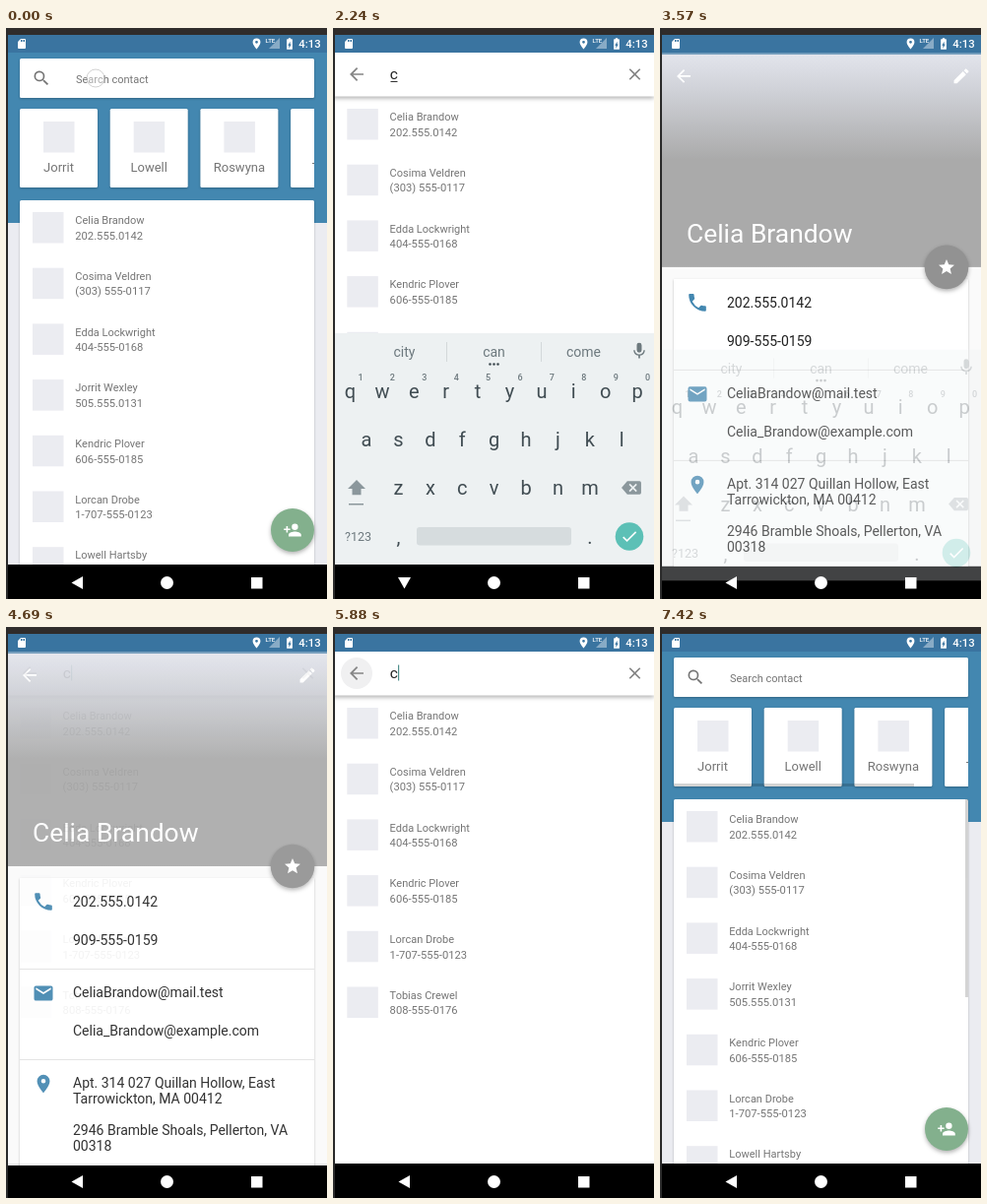
Write an HTML page that moves like this. It is 326x580 px and loops after 7.49 s.

```html
<!DOCTYPE html>
<html lang="en">
<head>
<meta charset="utf-8">
<title>Contacts</title>
<style>
html, body { margin: 0; height: 100%; overflow: hidden; background: #000; }
svg { display: block; width: 100vw; height: 100vh; font-family: Roboto, sans-serif; }
.low { filter: drop-shadow(0 1px 1px rgba(0,0,0,.25)); }
.high { filter: drop-shadow(0 2px 2px rgba(0,0,0,.3)); }
</style>
</head>
<body>
<svg id="stage" viewBox="0 0 326 580"></svg>
<script>
const LOOP = 7490, SLIDE = 46, KEYS_SLIDE = 25;
const PITCH = 56.7;
const GRAY = '#757575', BLUE = '#4387b0', BAR = '#3a74a0', TILE = '#ebecf1';

const people = [
  ['Celia Brandow', '202.555.0142'],
  ['Cosima Veldren', '(303) 555-0117'],
  ['Edda Lockwright', '404-555-0168'],
  ['Jorrit Wexley', '505.555.0131'],
  ['Kendric Plover', '606-555-0185'],
  ['Lorcan Drobe', '1-707-555-0123'],
  ['Lowell Hartsby', '707.555.0194'],
  ['Tobias Crewel', '808-555-0176']
];
const found = people.filter(p => /c/i.test(p[0]));

const icons = {
  back: 'M20 11H7.83l5.59-5.59L12 4l-8 8 8 8 1.41-1.41L7.83 13H20z',
  close: 'M19 6.41 17.59 5 12 10.59 6.41 5 5 6.41 10.59 12 5 17.59 6.41 19 12 13.41 17.59 19 19 17.59 13.41 12z',
  search: 'M15.5 14h-.79l-.28-.27A6.5 6.5 0 1 0 13.73 14.43l.27.28v.79l5 4.99L20.49 19zm-6 0a4.5 4.5 0 1 1 0-9 4.5 4.5 0 0 1 0 9z',
  add: 'M15 12a4 4 0 1 0 0-8 4 4 0 0 0 0 8zm-9-2V7H4v3H1v2h3v3h2v-3h3v-2zm9 4c-2.67 0-8 1.34-8 4v2h16v-2c0-2.66-5.33-4-8-4z',
  star: 'M12 17.27 18.18 21l-1.64-7.03L22 9.24l-7.19-.61L12 2 9.19 8.63 2 9.24l5.46 4.73L5.82 21z',
  edit: 'M3 17.25V21h3.75L17.81 9.94l-3.75-3.75zM20.71 7.04a1 1 0 0 0 0-1.41l-2.34-2.34a1 1 0 0 0-1.41 0l-1.83 1.83 3.75 3.75z',
  phone: 'M6.62 10.79a15.15 15.15 0 0 0 6.59 6.59l2.2-2.2a1 1 0 0 1 1.02-.24c1.12.37 2.33.57 3.57.57a1 1 0 0 1 1 1V20a1 1 0 0 1-1 1A17 17 0 0 1 3 4a1 1 0 0 1 1-1h3.5a1 1 0 0 1 1 1c0 1.25.2 2.45.57 3.57a1 1 0 0 1-.25 1.02z',
  mail: 'M20 4H4a2 2 0 0 0-2 2v12a2 2 0 0 0 2 2h16a2 2 0 0 0 2-2V6a2 2 0 0 0-2-2zm0 4-8 5-8-5V6l8 5 8-5z',
  pin: 'M12 2a7 7 0 0 0-7 7c0 5.25 7 13 7 13s7-7.75 7-13a7 7 0 0 0-7-7zm0 9.5a2.5 2.5 0 1 1 0-5 2.5 2.5 0 0 1 0 5z',
  mic: 'M12 14a3 3 0 0 0 3-3V5a3 3 0 0 0-6 0v6a3 3 0 0 0 3 3zm5.3-3a5.3 5.3 0 0 1-10.6 0H5a7 7 0 0 0 6 6.72V21h2v-3.28A7 7 0 0 0 19 11z',
  shift: 'M12 3 2 13h5v7h10v-7h5z',
  erase: 'M22 4H7L0 12l7 8h15a2 2 0 0 0 2-2V6a2 2 0 0 0-2-2zm-3 11.6L17.6 17 14 13.4 10.4 17 9 15.6l3.6-3.6L9 8.4 10.4 7l3.6 3.6L17.6 7 19 8.4 15.4 12z',
  check: 'M9 16.17 4.83 12l-1.42 1.41L9 19 21 7l-1.41-1.41z',
  card: 'M18 2h-8L4 8v12a2 2 0 0 0 2 2h12a2 2 0 0 0 2-2V4a2 2 0 0 0-2-2zM12 8h-2V4h2zm3 0h-2V4h2zm3 0h-2V4h2z',
  power: 'M16 4h-2V2h-4v2H8a1 1 0 0 0-1 1v16a1 1 0 0 0 1 1h8a1 1 0 0 0 1-1V5a1 1 0 0 0-1-1zm-5 16v-5H9l4-7v5h2z'
};

const rect = (x, y, w, h, fill, more = '') =>
  `<rect x="${x}" y="${y}" width="${w}" height="${h}" fill="${fill}" ${more}/>`;
const disc = (x, y, r, fill, more = '') =>
  `<circle cx="${x}" cy="${y}" r="${r}" fill="${fill}" ${more}/>`;
const text = (x, y, size, fill, s, more = '') =>
  `<text x="${x}" y="${y}" font-size="${size}" fill="${fill}" ${more}>${s}</text>`;
const mid = (x, y, size, fill, s, more = '') =>
  text(x, y, size, fill, s, 'text-anchor="middle" ' + more);
const icon = (name, x, y, k, fill) =>
  `<path d="${icons[name]}" fill="${fill}" fill-rule="evenodd" transform="translate(${x - 12 * k} ${y - 12 * k}) scale(${k})"/>`;
const group = (id, body) => `<g id="${id}">${body}</g>`;
const panel = (id, bg, body, barAlpha = 1) => group(id,
  rect(0, 25, 326, 520, bg) + body +
  rect(0, 7, 326, 18, BAR, `opacity="${barAlpha}"`) + rect(0, 545, 326, 35, '#000'));

function row([name, phone], i, x, y) {
  const top = y + i * PITCH;
  return rect(x, top, 31.5, 31.5, TILE) +
    text(x + 43.3, top + 12.2, 11, GRAY, name) +
    text(x + 43.3, top + 27.7, 11.2, GRAY, phone);
}

function home() {
  const cards = ['Jorrit', 'Lowell', 'Roswyna', 'Tilden'].map((name, i) => {
    const x = 14 + i * 91.7;
    return rect(x, 82, 79, 80, '#fff', 'rx="1.5" class="low"') +
      rect(x + 24, 95, 31.5, 31.5, TILE) + mid(x + 39.5, 146, 13, GRAY, name);
  }).join('');
  return panel('home', TILE,
    rect(0, 25, 326, 173, BLUE) +
    rect(14, 31, 299, 40, '#fff', 'rx="1.5" class="low"') +
    `<g clip-path="url(#box)">${disc(91, 51, 0, '#000', 'id="tapWave"')}</g>` +
    icon('search', 36, 51, .83, GRAY) + text(71, 55.5, 11, GRAY, 'Search contact') +
    disc(91, 51, 9, '#fff', 'id="touch" fill-opacity=".4" stroke="#999" stroke-opacity=".45"') +
    `<g clip-path="url(#cards)">${cards}</g>` +
    rect(14, 175, 299, 380, '#fff', 'rx="1.5" class="low"') +
    people.slice(0, 7).map((p, i) => row(p, i, 27, 187)).join('') +
    group('bars', rect(14, 159, 244, 3, '#000') + rect(310, 175, 3, 201, '#000')) +
    disc(291, 510, 22, '#83b08d', 'class="high"') + icon('add', 291, 510, .8, '#fff'));
}

function search() {
  return panel('search', '#fff',
    group('results', found.map((p, i) => row(p, i, 14.3, 82)).join('')) +
    `<g clip-path="url(#firstRow)">${disc(150, 98, 0, '#42708f', 'id="rowWave"')}</g>` +
    rect(0, 25, 326, 44.5, '#fff', 'class="high"') +
    disc(24, 47, 0, '#f0f0f1', 'id="backWave"') +
    icon('back', 24, 47, .87, '#858585') + icon('close', 306.5, 47, .83, '#858585') +
    group('query', text(57.7, 52, 15.5, '#222', 'c')) +
    rect(58.5, 54, 7, 1, '#333', 'id="underline"') +
    rect(0, 38.5, 1.2, 16, '#4f8f8c', 'id="caret"'));
}

function detail() {
  const line = (y, s) => text(68, y, 14, '#212121', s);
  return panel('detail', '#fafafa',
    rect(14, 253, 299, 310, '#fff', 'class="low"') +
    rect(0, 25, 326, 216, 'url(#cover)') +
    icon('back', 24, 47, .87, '#fff') + group('edit', icon('edit', 306, 47, .83, '#fff')) +
    text(27, 216, 26.4, '#fff', 'Celia Brandow') +
    disc(291, 241, 22.3, '#929292', 'class="high"') + icon('star', 291, 241, .8, '#fff') +
    icon('phone', 38, 277, .98, BLUE) + line(282, people[0][1]) + line(321, '909-555-0159') +
    rect(14, 345, 299, 1, '#e2e2e2') +
    icon('mail', 38, 370, .95, BLUE) +
    line(374, 'CeliaBrandow@mail.test') + line(413, 'Celia_Brandow@example.com') +
    rect(14, 437, 299, 1, '#e2e2e2') +
    icon('pin', 38, 462, .92, BLUE) +
    line(466, 'Apt. 314 027 Quillan Hollow, East') + line(482.5, 'Tarrowickton, MA 00412') +
    line(514, '2946 Bramble Shoals, Pellerton, VA') + line(530.5, '00318'), .75);
}

function keyboard() {
  const INK = '#414d53', SOFT = '#6d797e', STEP = 32.4;
  const keys = (s, x, y) => [...s].map((c, i) => mid(x + i * STEP, y, 20, INK, c)).join('');
  const hints = [...'1234567890'].map((c, i) =>
    mid(28 + i * STEP, 358, 9, SOFT, c, 'font-weight="500"')).join('');
  const words = ['city', 'can', 'come'].map((w, i) => mid(72.5 + i * 91, 334, 14, SOFT, w)).join('');
  const dots = [159.5, 163.5, 167.5].map(x => disc(x, 341.5, 1.3, INK)).join('');
  return group('keys',
    rect(0, 310, 326, 235, '#edf1f2') + rect(0, 545, 326, 35, '#000') +
    rect(115, 319, 1, 20, '#d3d8da') + rect(211, 319, 1, 20, '#d3d8da') +
    icon('mic', 311, 328, .83, SOFT) + group('words', words + dots) + hints +
    keys('qwertyuiop', 17.5, 375.5) + keys('asdfghjkl', 34, 425) + keys('zxcvbnm', 66.5, 474) +
    icon('shift', 24, 467, .9, '#8b979c') + rect(16, 483, 15, 1.5, '#8b979c') +
    icon('erase', 303, 467, .83, '#8b979c') +
    text(12, 521, 12.5, SOFT, '?123') + mid(66.5, 524, 20, INK, ',') + mid(261, 524, 20, INK, '.') +
    rect(85, 507, 157, 18.5, '#d6dcde', 'rx="3"') +
    disc(301, 516.5, 14.3, '#5cc0b6') + icon('check', 301, 516.5, .8, '#fff'));
}

function chrome() {
  return icon('card', 16, 16, .5, '#fff') + icon('pin', 254.5, 16, .56, '#fff') +
    text(263.5, 14.5, 6, '#fff', 'LTE', 'font-weight="700" opacity=".85"') +
    '<path d="M267 21H278V10Z" fill="#fff" opacity=".4"/>' +
    icon('power', 288, 16, .58, '#fff') +
    text(297.3, 20, 11.3, '#fff', '4:13', 'font-weight="500"') +
    `<path id="navBack" fill="#fff"/>` +
    disc(163.5, 563.5, 6.5, '#fff') + rect(249, 558, 11.5, 11.5, '#fff') +
    rect(0, 0, 326, 7, '#2f2c2b') + rect(0, 0, 2, 580, '#2a2a2a');
}

const clip = (id, x, y, w, h) => `<clipPath id="${id}">${rect(x, y, w, h, '#000')}</clipPath>`;
document.getElementById('stage').innerHTML =
  '<defs>' + clip('box', 14, 31, 299, 40) + clip('cards', 12, 80, 301, 86) +
  clip('firstRow', 0, 70, 326, 56) +
  `<linearGradient id="cover" gradientUnits="userSpaceOnUse" x1="0" y1="25" x2="0" y2="132">
   <stop stop-color="#e2e4ec"/><stop offset=".35" stop-color="#cfd1d7"/><stop offset="1" stop-color="#aaa"/></linearGradient></defs>` +
  home() + search() + detail() + keyboard() + chrome();

const ui = {};
document.querySelectorAll('svg [id]').forEach(e => ui[e.id] = e);

const part = (t, from, to) => Math.min(1, Math.max(0, (t - from) / (to - from)));
const within = (t, from, to) => t >= from && t < to;

function fade(el, a) {
  el.setAttribute('opacity', a);
  el.setAttribute('display', a > 0 ? 'inline' : 'none');
}
function shift(el, y) { el.setAttribute('transform', `translate(0 ${y})`); }
function wave(el, r, a) { el.setAttribute('r', r); fade(el, a); }

// A window rises while fading in, and sinks while fading out.
function openClose(el, t, dist, [inAt, inFor, fadeFor], [outAt, outEnd]) {
  const p = part(t, inAt, inAt + inFor), q = part(t, outAt, outEnd);
  shift(el, dist * ((1 - p) ** 2 + q * q));
  fade(el, t < outAt ? part(t, inAt, inAt + fadeFor) : 1 - q ** 1.6);
}

const blinks = [770, 1190, 1470, 2170, 2380, 5040, 5600];

function draw(t) {
  fade(ui.touch, 1 - part(t, 70, 210));
  wave(ui.tapWave, 230 * part(t, 70, 420), t < 700 ? .1 : 0);
  fade(ui.bars, t > 5900 ? .24 - .07 * part(t, 7210, 7420) : 0);

  openClose(ui.search, t, SLIDE, [260, 365, 133], [5940, 6290]);
  const typed = t >= 1540;
  fade(ui.query, typed ? 1 : 0);
  fade(ui.underline, within(t, 1540, 3640) ? 1 : 0);
  fade(ui.results, part(t, 1680, 1960));
  ui.caret.setAttribute('x', typed ? 66 : 58);
  fade(ui.caret, blinks.filter(b => t >= b).length % 2);
  wave(ui.rowWave, 190 * part(t, 2520, 3150), t < 3800 ? .3 * part(t, 2480, 2700) : 0);
  wave(ui.backWave, 16 * part(t, 5440, 5740), t > 5440 ? 1 : 0);

  openClose(ui.detail, t, SLIDE, [3280, 365, 133], [4640, 4885]);
  fade(ui.edit, part(t, 3360, 3500));

  openClose(ui.keys, t, KEYS_SLIDE, [550, 133, 88], [3400, 3610]);
  fade(ui.words, typed ? 1 : 0);
  ui.navBack.setAttribute('d', within(t, 550, 3500)
    ? 'M66 558H79L72.5 569.5Z' : 'M66.5 563.5 78 557V570Z');
}

const start = performance.now();
function tick() {
  draw((performance.now() - start) % LOOP);
  requestAnimationFrame(tick);
}
draw(0);
requestAnimationFrame(tick);
</script>
</body>
</html>
```
